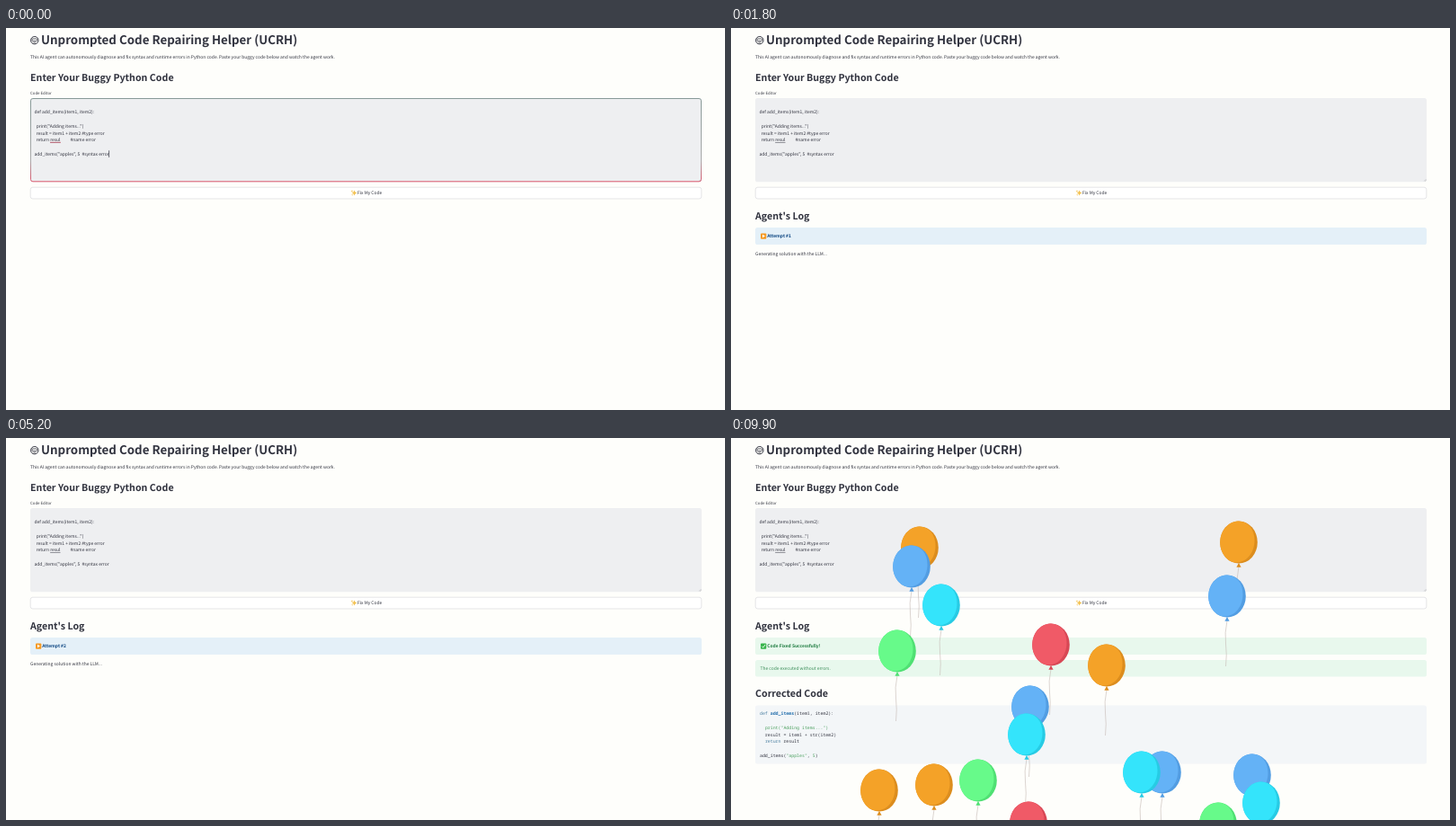
Recreate the animation shown at these times as an HTML page. Size 800x425 px, loop 10 s.

```html
<!DOCTYPE html>
<html lang="en">
<head>
<meta charset="utf-8">
<style>
html, body { margin: 0; width: 100%; height: 100%; overflow: hidden; background: #fefefb; }
svg { display: block; width: 100vw; height: 100vh; text-rendering: geometricPrecision; }
text { font: 4.95px "Noto Sans CJK JP", "Noto Sans CJK SC", "Noto Sans CJK KR", "Open Sans", sans-serif; fill: #31333f; white-space: pre; }
.h1 { font-size: 13.35px; font-weight: 700; }
.h2 { font-size: 10.67px; font-weight: 700; }
.label { font-size: 4.33px; }
.bold { font-weight: 700; }
.info { fill: #0a4480; }
.good { fill: #1c7a3e; }
.mono text { font: 4.9px "Noto Sans Mono", "DejaVu Sans Mono", monospace; }
.fn { fill: #1f6cab; font-weight: 700; }
.kw { fill: #4b7fa0; }
.str { fill: #4ba05f; }
</style>
</head>
<body>
<svg viewBox="0 0 800 425" preserveAspectRatio="none" xml:space="preserve">
  <defs>
    <linearGradient id="focusLine" x1="0" y1="0" x2="0" y2="1">
      <stop offset="0" stop-color="#879997"/>
      <stop offset=".75" stop-color="#a9a9aa"/>
      <stop offset="1" stop-color="#d9566c"/>
    </linearGradient>
  </defs>

  <g fill="none" stroke="#31333f">
    <circle cx="31.8" cy="13.7" r="4.2" stroke-width="1"/>
    <rect x="28.9" y="12" width="5.8" height="2.6" rx="1.2" stroke-width=".8"/>
    <path d="M30.4 16.2h2.8" stroke-width=".7"/>
  </g>
  <text class="h1" x="39" y="18.3">Unprompted Code Repairing Helper (UCRH)</text>
  <text x="27" y="33.7">This AI agent can autonomously diagnose and fix syntax and runtime errors in Python code. Paste your buggy code below and watch the agent work.</text>
  <text class="h2" x="27" y="59">Enter Your Buggy Python Code</text>
  <text class="label" x="27" y="73.8">Code Editor</text>

  <rect x="27" y="78" width="747" height="93.3" rx="2.6" fill="#eeeff1"/>
  <path d="M771.3 170.3l2-2M772.5 170.5l1-1" stroke="#888" stroke-width=".4"/>
  <text x="31.5" y="95.2">def add_items(item1, item2):</text>
  <text x="31.5" y="110.8">  print("Adding items...")</text>
  <text x="31.5" y="118.6">  result = item1 + item2 #type error</text>
  <text x="31.5" y="126.4">  return <tspan text-decoration="underline">resul</tspan>          #name error</text>
  <text x="31.5" y="142">add_items("apples", 5  #syntax error</text>
  <g id="focus" fill="none">
    <rect x="27.5" y="78.5" width="746" height="92.3" rx="2.4" stroke="url(#focusLine)"/>
    <path d="M49 127.3h12" stroke="#d9566c" stroke-width=".7"/>
  </g>
  <path id="caret" d="M114.6 136.3v7.6" stroke="#31333f" stroke-width=".7"/>

  <rect x="27.2" y="177.2" width="746.6" height="12.8" rx="2.6" fill="#fff" stroke="#d3d4d8" stroke-width=".6"/>
  <path d="M387.6 180.6q.5 2.5 2.7 2.9q-2.2 .4-2.7 2.9q-.5-2.5-2.7-2.9q2.2-.4 2.7-2.9zM385 180.3l.4 1 1 .4-1 .4-.4 1-.4-1-1-.4 1-.4zM385.2 184.6l.3 .8.8.3-.8.3-.3.8-.3-.8-.8-.3.8-.3z" fill="#f3c04d"/>
  <text x="391" y="185.3">Fix My Code</text>

  <g id="log">
    <text class="h2" x="27" y="213">Agent's Log</text>
    <g id="running">
      <rect x="27" y="222" width="747" height="19" rx="2.6" fill="#e4f0f8"/>
      <rect x="33" y="228.4" width="6.3" height="6.3" rx=".9" fill="#f59a23"/>
      <path d="M35 229.8l3 1.75-3 1.75z" fill="#fff"/>
      <text id="attempt" class="bold info" x="40.2" y="233.3"></text>
      <text id="status" x="27" y="252.6"></text>
    </g>
  </g>

  <g id="done">
    <rect x="27" y="222" width="747" height="19" rx="2.6" fill="#e8f8ed"/>
    <rect x="33" y="228.4" width="6.3" height="6.3" rx=".9" fill="#36b44a"/>
    <path d="M34.3 231.7l1.4 1.5 2.4-3.3" fill="none" stroke="#fff" stroke-width=".9"/>
    <text class="bold good" x="40.2" y="233.3">Code Fixed Successfully!</text>
    <rect x="27" y="247" width="747" height="18.6" rx="2.6" fill="#e8f8ed"/>
    <text id="result" class="good" x="32.5" y="257.8">The code executed without errors.</text>
    <text class="h2" x="27" y="288">Corrected Code</text>
    <rect x="27" y="297.5" width="747" height="65" rx="2.6" fill="#f3f6f8"/>
    <g id="fixed" class="mono">
      <text x="32" y="308.4"><tspan class="kw">def</tspan> <tspan class="fn">add_items</tspan>(item1, item2):</text>
      <text x="32" y="323.9">  <tspan class="str">print("Adding items...")</tspan></text>
      <text x="32" y="331.6">  result = item1 + str(item2)</text>
      <text x="32" y="339.3">  <tspan class="kw">return</tspan> result</text>
      <text x="32" y="354.8">add_items(<tspan class="str">"apples"</tspan>, <tspan class="str">5</tspan>)</text>
    </g>
    <g id="balloons"></g>
  </g>
</svg>
<script>
const $ = id => document.getElementById(id);
const show = (id, opacity) => $(id).setAttribute("opacity", +opacity);
const clamp = v => Math.max(0, Math.min(1, v));

const LOOP = 10000, TICK = 100, DONE = 9800, LAST = 9900;

// start time, attempt number, status line
const steps = [
  [0, 1, ""],
  [600, 1, "Executing code..."],
  [1600, 1, "Generating solution with the LLM..."],
  [3100, 1, "Applying the patch..."],
  [3400, 2, "Executing code..."],
  [4700, 2, "Generating solution with the LLM..."],
  [8200, 2, "Applying the patch..."],
  [8400, 3, "Executing code..."]
];

// fill and shade
const paint = {
  orange: ["#f4a228", "#dc8d1e"],
  blue: ["#64b2f6", "#529de2"],
  cyan: ["#34e4fb", "#27cbe4"],
  green: ["#67fa8a", "#4fe073"],
  red: ["#f05a67", "#d84755"]
};

// colour, resting centre, rise during the last tick
const balloons = [
  ["orange", 210, 122], ["blue", 201, 143, 288], ["cyan", 234, 186],
  ["green", 185, 237], ["red", 356, 230], ["orange", 418, 253],
  ["blue", 333, 299], ["cyan", 329, 330], ["orange", 565, 116],
  ["blue", 552, 176, 265], ["orange", 165, 392], ["orange", 226, 386],
  ["green", 275, 381], ["red", 331, 428], ["blue", 480, 372],
  ["cyan", 457, 372], ["blue", 580, 375], ["cyan", 590, 406],
  ["green", 542, 429]
].map(([color, x, y, rise = 440]) => ({ color, x, y, rise }));

$("balloons").innerHTML = balloons.map(({ color }) => {
  const [fill, shade] = paint[color];
  return `<g><path d="M0 27q-3 14-1.5 26t0 25" fill="none" stroke="#c4b9b4" stroke-width=".6"/>
    <path d="M0 23l2.6 4.8h-5.2z" fill="${shade}"/>
    <ellipse rx="20.8" ry="23.6" fill="${shade}"/>
    <path d="M0-23.6C-11.5-23.6-20.8-13-20.8 0S-12 22.5-3 22.5C9 22.5 17.5 11 17.5-2S10-23.6 0-23.6z" fill="${fill}"/></g>`;
}).join("");

function draw(now) {
  const t = Math.floor(now % LOOP / TICK) * TICK;
  const [, attempt, status] = steps.findLast(step => step[0] <= t);
  const done = t >= DONE, last = t >= LAST;

  show("caret", t < 100);
  show("focus", clamp((500 - t) / 200));
  show("log", clamp((t - 400) / 300));
  show("running", !done);
  $("attempt").textContent = "Attempt #" + attempt;
  $("status").textContent = status;

  show("done", done);
  show("result", last ? 0.85 : 0.6);
  show("fixed", last);
  balloons.forEach(({ x, y, rise }, i) => {
    const drop = rise * (LAST - t) / TICK;
    $("balloons").children[i].setAttribute("transform", `translate(${x} ${y + drop})`);
  });
  requestAnimationFrame(draw);
}
requestAnimationFrame(draw);
</script>
</body>
</html>
```
